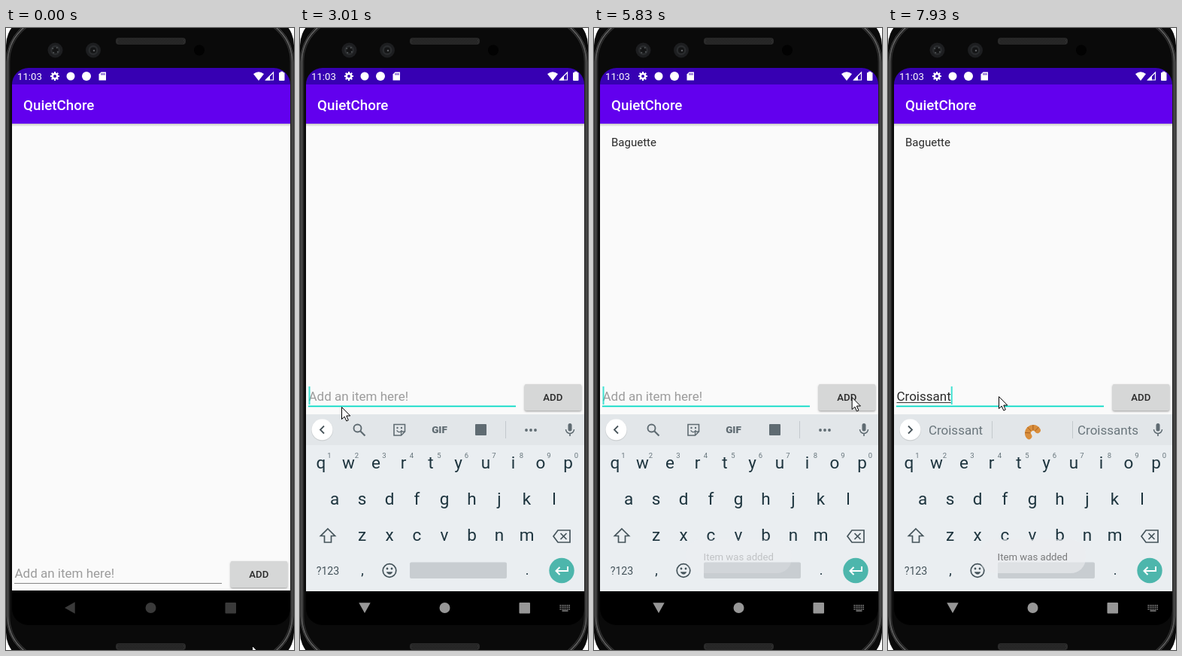
Write an HTML page with a canvas that moves like this. It is 383x826 px and loops after 8 s.

```html
<!DOCTYPE html>
<html lang="en">
<head>
<meta charset="utf-8">
<title>To-do list demo</title>
<style>
html, body { margin: 0; width: 100%; height: 100%; overflow: hidden; background: #0a0a0a; }
canvas { display: block; width: 383px; height: 826px; }
</style>
</head>
<body>
<canvas id="stage"></canvas>
<script>
const W = 383, H = 826, LOOP = 8000, TAU = Math.PI * 2;
const canvas = document.getElementById('stage');
const ratio = window.devicePixelRatio || 1;
canvas.width = W * ratio;
canvas.height = H * ratio;
const c = canvas.getContext('2d');
const TEAL = '#03dac5', ICON = '#5f6b72', KEY = '#1d343e', INK = '#2a2a2a';

// Time, x, y of the pointer
const PATH = [
  [0, 327, 820], [70, 325, 817], [400, 255, 772], [830, 182, 728], [980, 175, 720],
  [1580, 175, 720], [1750, 160, 630], [1920, 136, 531], [2090, 136, 531], [2170, 92, 517],
  [2250, 56, 504], [2400, 55, 503], [4820, 55, 503], [4900, 76, 515], [4980, 112, 530],
  [5140, 230, 520], [5300, 345, 500], [5380, 371, 495], [5520, 345, 490], [5830, 343, 490],
  [6080, 255, 492], [6300, 170, 490], [6460, 147, 489], [8000, 147, 489]
];
// Time and content of the text field
const TYPED = [
  [0, ''], [3250, 'B'], [3330, 'Ba'], [3800, 'Bag'], [3880, 'Bagu'], [3960, 'Bague'],
  [4110, 'Baguet'], [4190, 'Baguett'], [4280, 'Baguette'], [5670, ''],
  [6940, 'C'], [7210, 'Cro'], [7290, 'Croi'], [7450, 'Crois'], [7530, 'Croiss'],
  [7690, 'Croissa'], [7770, 'Croissan'], [7850, 'Croissant']
];
// Time and the three words above the keys
const HINTS = [
  [0, null], [3330, ['Ba', 'Bad', 'Back']], [3800, ['Bag', 'Bags', 'Bagel']],
  [3960, ['Bague', 'Baguette', 'Baguettes']], [4190, ['Baguette', 'bread', 'Baguettes']],
  [5670, null], [6940, ['C', 'Can', 'Call']],
  [7290, ['Croi', 'Croissant', 'Croissants']], [7530, ['Croissant', 'roll', 'Croissants']]
];
// Moments when the caret toggles, starting hidden
const BLINKS = [980, 1500, 2010, 2480, 3010, 4740, 5250, 6120, 6620];

const clamp = v => Math.max(0, Math.min(1, v));
const ramp = (t, a, b) => clamp((t - a) / (b - a));
const latest = (list, t) => list.filter(s => s[0] <= t).pop();

function box(x, y, w, h, r, fill) {
  c.beginPath();
  c.roundRect(x, y, w, h, r);
  c.fillStyle = fill;
  c.fill();
}
function ring(x, y, r, color, width) {
  c.beginPath();
  c.arc(x, y, r, 0, TAU);
  c.strokeStyle = color;
  c.lineWidth = width;
  c.stroke();
}
function dot(x, y, r, color) {
  c.beginPath();
  c.arc(x, y, r, 0, TAU);
  c.fillStyle = color;
  c.fill();
}
function trace(pts, closed) {
  c.beginPath();
  for (let i = 0; i < pts.length; i += 2) c.lineTo(pts[i], pts[i + 1]);
  if (closed) c.closePath();
}
function poly(pts, fill) {
  trace(pts, true);
  c.fillStyle = fill;
  c.fill();
}
function line(pts, color, width, closed) {
  trace(pts, closed);
  c.strokeStyle = color;
  c.lineWidth = width;
  c.stroke();
}
function text(s, x, y, size, color, align = 'left', weight = 400) {
  c.font = `${weight} ${size}px Roboto, sans-serif`;
  c.textAlign = align;
  c.fillStyle = color;
  c.fillText(s, x, y);
  return c.measureText(s).width;
}

function speaker(y) {
  box(146, y, 93, 9, 4, '#2b2b2b');
  c.fillStyle = '#191919';
  for (let r = 0; r < 4; r++)
    for (let x = 149 + r % 2; x < 236; x += 2) c.fillRect(x, y + 1 + r * 2, 1, 1);
}

function drawPhone() {
  box(0, 0, W, H, 0, '#fff');
  box(0, -17, W, H + 34, 40, '#0a0a0a');
  const frame = (inset, color, width) => {
    c.beginPath();
    c.roundRect(inset, inset - 17, W - inset * 2, H + 34 - inset * 2, 62 - inset);
    c.strokeStyle = color;
    c.lineWidth = width;
    c.stroke();
  };
  frame(0.5, '#4a4a4a', 1);
  frame(2.5, '#6e6e6e', 1.4);
  frame(4.5, '#2c2c2c', 1.6);
  speaker(13);
  speaker(817);
  for (const x of [65.5, 116]) {
    dot(x, 29.5, 10, '#1d1e20');
    dot(x, 29.5, 6.5, '#2a2c2e');
    dot(x, 29.5, 4, '#141516');
  }
  for (let i = 0; i < 4; i++) dot(65.5 + 4 * Math.cos(i * 1.57 + .6), 29.5 + 4 * Math.sin(i * 1.57 + .6), 1, '#54575a');
  dot(117, 30, 1.3, '#5a5d60');
  dot(257, 29.5, 7, '#020202');
}

function drawStatus() {
  box(8, 53, 370, 22, 0, '#3700b3');
  text('11:03', 15, 69, 13.2, '#fff');
  ring(65, 64, 3.3, '#fff', 2.6);
  for (let i = 0; i < 8; i++) {
    const a = i * TAU / 8, x = Math.cos(a), y = Math.sin(a);
    line([65 + x * 4, 64 + y * 4, 65 + x * 6, 64 + y * 6], '#fff', 2);
  }
  dot(86, 64, 5.5, '#fff');
  dot(107, 64, 6, '#fff');
  poly([126.5, 58.5, 133, 58.5, 133, 69.5, 123.5, 69.5, 123.5, 61.5], '#fff');
  for (const x of [126.5, 128.5, 130.5]) box(x, 60, 1, 2.5, 0, '#3700b3');
  c.beginPath();
  c.moveTo(336, 70);
  c.lineTo(329, 61);
  c.quadraticCurveTo(336, 55.5, 343, 61);
  c.closePath();
  c.fillStyle = '#fff';
  c.fill();
  line([345.5, 69, 355.5, 69, 355.5, 59], '#fff', 1.2, true);
  poly([345, 69.5, 351, 63.5, 351, 69.5], '#fff');
  box(363, 59, 7.5, 11, 1, '#fff');
  box(365, 57.7, 3.5, 2, 0, '#fff');
}

function drawApp(t) {
  box(8, 75, 370, 672, 0, '#fafafa');
  const shade = c.createLinearGradient(0, 127, 0, 131);
  shade.addColorStop(0, '#c4c4c4');
  shade.addColorStop(1, '#fafafa');
  box(8, 127, 370, 4, 0, shade);
  box(8, 75, 370, 52, 0, '#6200ee');
  text('QuietChore', 23, 109, 18.8, '#fff', 'left', 500);
  if (t >= 5750) text('Baguette', 23, 156.5, 15, INK);
  drawEntry(t, t < 1460 ? 0 : -235);
}

function drawEntry(t, dy) {
  c.save();
  c.translate(0, dy);
  const value = latest(TYPED, t)[1];
  const focused = t >= 910;
  let end = 0;
  if (value) {
    end = text(value, 11.5, 730, 17, INK);
    if (t < 5590 || t >= 6940) box(11.5, 732, end, 1, 0, '#333');
  } else {
    text('Add an item here!', 11.5, 730, 17, '#9c9c9c');
  }
  box(11, focused ? 736.5 : 737, 276, focused ? 1.8 : 1, 0, focused ? TEAL : '#858585');
  const flips = BLINKS.filter(b => b <= t).length;
  const typing = (t >= 3250 && t < 4740) || t >= 6940;
  if (typing || flips % 2) {
    c.globalAlpha = .75;
    box(11.5 + end, 711, 2, 24, 0, TEAL);
    c.globalAlpha = 1;
  }

  c.save();
  c.shadowColor = 'rgba(0,0,0,.35)';
  c.shadowBlur = 2.5 * ratio;
  c.shadowOffsetY = 1.2 * ratio;
  box(298.7, 708, 75.5, 35, 2, t >= 5520 && t < 5830 ? '#c6c7c7' : '#d6d7d7');
  c.restore();
  text('ADD', 336.3, 730, 13.2, INK, 'center', 500);
  c.restore();
}

function drawBread() {
  c.save();
  c.translate(191.5, 534);
  c.rotate(-.78);
  box(-12.5, -3.5, 25, 7, 3.5, '#d99545');
  box(-11, -2.8, 22, 3, 1.5, '#efbd72');
  for (let x = -8; x < 9; x += 4) line([x, -2.5, x + 2.5, 2], '#f9dca4', 1.3);
  c.restore();
}

function drawRoll() {
  c.beginPath();
  c.arc(193, 538, 7, 2.5, 5.7);
  c.lineCap = 'round';
  c.strokeStyle = '#d98e3c';
  c.lineWidth = 8;
  c.stroke();
  c.lineCap = 'butt';
  for (let a = 3.2; a < 5.6; a += .75) {
    const x = Math.cos(a), y = Math.sin(a);
    line([193 + x * 4, 538 + y * 4, 193 + x * 11, 538 + y * 11], '#a8601f', 1);
  }
}

function drawStrip(words) {
  dot(29.5, 534, 14.5, 'rgba(0,0,0,.1)');
  dot(29.5, 533.3, 14, '#fff');
  const d = words ? -1 : 1;
  line([29.5 + d * 2.5, 528.5, 29.5 - d * 2.5, 533.5, 29.5 + d * 2.5, 538.5], '#48545a', 1.8);
  box(356.5, 525, 5, 10.5, 2.5, ICON);
  c.beginPath();
  c.arc(359, 533, 5.5, 0, Math.PI);
  c.strokeStyle = ICON;
  c.lineWidth = 1.5;
  c.stroke();
  box(358.2, 538, 1.6, 4, 0, ICON);

  if (words) {
    box(138, 522, 1, 23, 0, '#c3c9cd');
    box(245, 522, 1, 23, 0, '#c3c9cd');
    [90, 192, 292.5].forEach((x, i) => {
      if (words[i] === 'bread') drawBread();
      else if (words[i] === 'roll') drawRoll();
      else text(words[i], x, 540, 17, '#6a767c', 'center');
    });
    return;
  }
  ring(76.5, 531.5, 5, ICON, 1.9);
  line([80, 535, 86.5, 541.5], ICON, 2.2);
  line([125, 526.5, 139.5, 526.5, 139.5, 536, 134.5, 541, 125, 541], ICON, 1.6, true);
  line([134.5, 541, 134.5, 536, 139.5, 536], ICON, 1.3);
  dot(129.5, 531, 1.2, ICON);
  dot(135, 531, 1.2, ICON);
  c.beginPath();
  c.arc(132, 533, 3.5, .3, 2.8);
  c.stroke();
  text('GIF', 185.5, 538, 13.5, ICON, 'center', 900);
  box(233, 526, 15, 15, 1, ICON);
  box(273, 522, 1, 23, 0, '#c3c9cd');
  for (const x of [301, 307, 313]) dot(x, 534, 1.9, ICON);
}

function drawKeys() {
  const row = (keys, x, y) => [...keys].forEach((k, i) => text(k, x + i * 36.5, y, 22.5, KEY, 'center'));
  row('qwertyuiop', 28, 585);
  row('asdfghjkl', 46, 633);
  row('zxcvbnm', 82.5, 681);
  [...'1234567890'].forEach((n, i) => text(n, 39 + i * 36.5, 570.5, 9.5, '#66747b', 'center'));

  line([37, 665, 46.5, 674.5, 41.5, 674.5, 41.5, 683, 32.5, 683, 32.5, 674.5, 27.5, 674.5], '#45545b', 1.7, true);
  line([337, 675, 343, 667, 359, 667, 359, 683, 343, 683], '#45545b', 1.7, true);
  line([346.5, 671, 354.5, 679], '#45545b', 1.7);
  line([354.5, 671, 346.5, 679], '#45545b', 1.7);

  text('?123', 37, 725.5, 14.2, '#45545b', 'center');
  text(',', 83, 725.5, 18, KEY, 'center');
  text('.', 302, 725.5, 18, KEY, 'center');
  ring(119, 720.5, 8.8, '#45545b', 1.7);
  dot(116, 718, 1.4, '#45545b');
  dot(122, 718, 1.4, '#45545b');
  c.beginPath();
  c.arc(119, 721, 4.4, .3, Math.PI - .3);
  c.fillStyle = '#45545b';
  c.fill();
  box(146, 709.5, 129, 21.5, 2, '#c8cdd1');
  dot(348, 720.5, 16.7, '#4db6ac');
  line([356, 715, 356, 721, 341, 721], '#fff', 2);
  line([345.5, 716, 340.5, 721, 345.5, 726], '#fff', 2);
}

function drawKeyboard(t) {
  if (t < 1440) return;
  const late = Math.pow(1 - ramp(t, 1440, 1695), 5);
  c.save();
  c.globalAlpha = 1 - late;
  c.translate(0, 47 * late);
  box(8, 513, 370, 235, 0, '#eaeef1');
  box(8, 513, 370, 41, 0, '#e2e6e9');
  drawStrip(latest(HINTS, t)[1]);
  drawKeys();
  c.restore();
}

function drawNav(t) {
  const color = t < 1140 ? '#3a3a3a' : '#979797';
  const turn = ramp(t, 1380, 1520);
  c.save();
  c.translate(86, 770 - turn);
  c.rotate(-Math.PI / 2 * turn);
  poly([-8, 0, 5.7, -7.7, 5.7, 7.7], color);
  c.restore();
  dot(192.5, 770, 7, color);
  box(291.5, 763, 14.5, 14.5, 1, color);
  if (t < 1140) return;
  for (let r = 0; r < 3; r++)
    for (let i = 0; i < 6; i++) box(345.5 + i * 2.4, 766 + r * 2.5, 1.5, 1.5, 0, '#8a8a8a');
  box(348.5, 773.2, 8, 1.5, 0, '#8a8a8a');
}

function drawToast(t) {
  const alpha = ramp(t, 5750, 6100) * (1 - ramp(t, 7680, 8350));
  if (!alpha) return;
  c.save();
  c.globalAlpha = alpha;
  box(122, 679, 141, 45, 20, '#eceef0');
  text('Item was added', 192.3, 707, 13.2, '#333', 'center');
  c.restore();
}

function drawPointer(t) {
  const i = Math.max(1, PATH.findIndex(p => p[0] > t));
  const a = PATH[i - 1], b = PATH[i], k = ramp(t, a[0], b[0]);
  c.save();
  c.translate(a[1] + (b[1] - a[1]) * k + .5, a[2] + (b[2] - a[2]) * k + .5);
  const arrow = [0, 0, 0, 16, 3.7, 12.6, 6.3, 18.4, 8.8, 17.3, 6.3, 11.5, 11.3, 11.5];
  poly(arrow, '#fff');
  line(arrow, '#000', 1, true);
  c.restore();
}

function draw(now) {
  const t = now % LOOP;
  c.setTransform(ratio, 0, 0, ratio, 0, 0);
  drawPhone();
  c.save();
  c.beginPath();
  c.roundRect(8, 53, 370, 740, 22);
  c.clip();
  box(8, 747, 370, 46, 0, '#000');
  drawApp(t);
  drawStatus();
  drawKeyboard(t);
  drawNav(t);
  drawToast(t);
  c.restore();
  drawPointer(t);
}

const start = performance.now();
function tick() {
  draw(performance.now() - start);
  requestAnimationFrame(tick);
}
tick();
</script>
</body>
</html>
```
